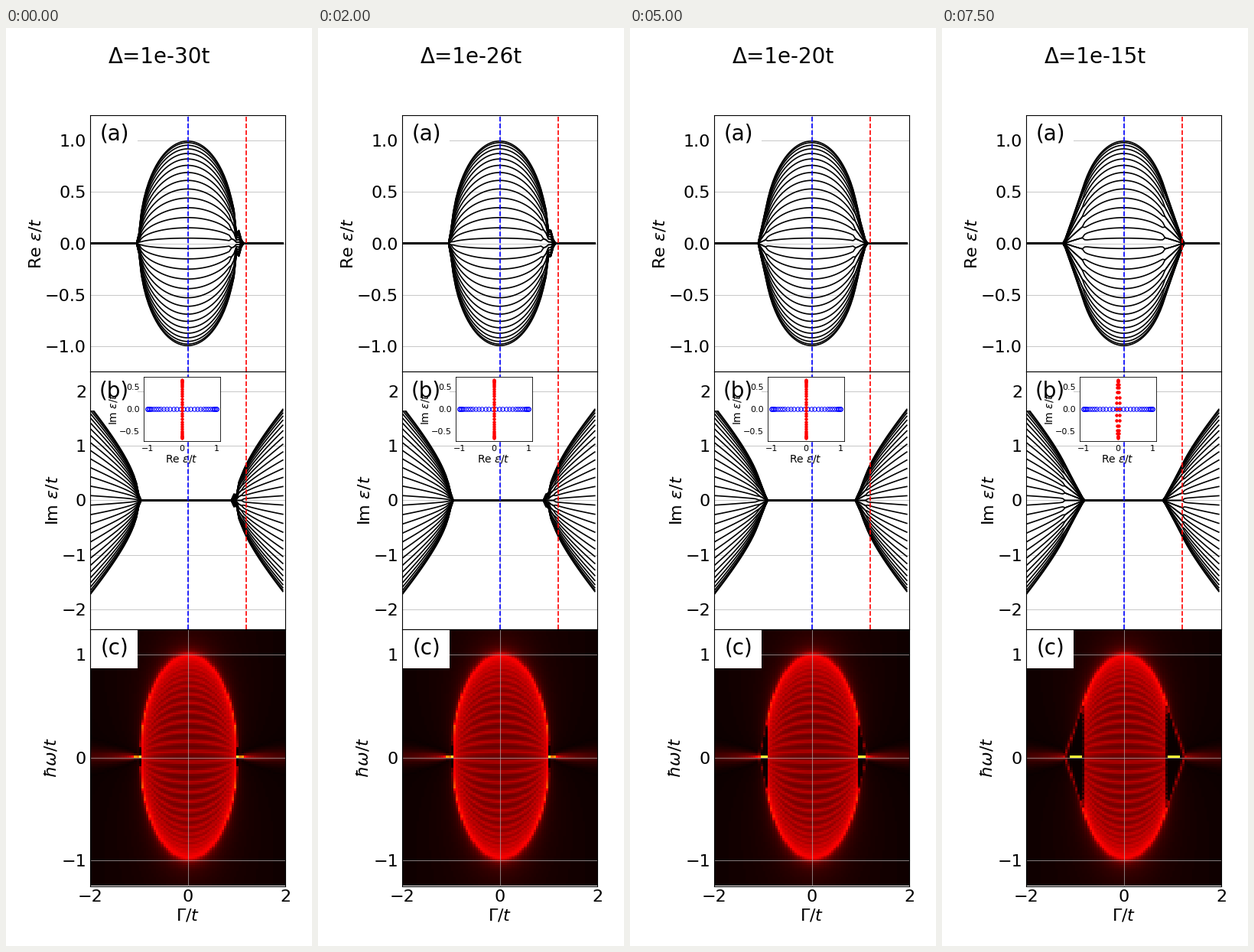
Recreate the animation shown at these times as a matplotlib script. Size 400 by 1200 pixels, loop 8000 ms.

```python
import numpy as np
import matplotlib.pyplot as plt
from matplotlib.animation import FuncAnimation
from matplotlib.patches import Rectangle

W, H = 400, 1200
SITES = 30
ETA = 0.02
FRAMES = 16

gammas = np.arange(-2, 2, 0.05)
omegas = np.linspace(-1.25, 1.25, 125)
BLUE_G, RED_G = 40, 64          # columns of gamma = 0 and gamma = 1.2

plt.rcParams.update({
    "font.family": "DejaVu Sans", "font.size": 16, "mathtext.fontset": "dejavusans",
    "xtick.major.size": 0, "ytick.major.size": 0,
    "grid.color": "#b0b0b0", "grid.linewidth": 0.5,
})


def spectrum(gamma, delta):
    """Eigenvalues of the chain with unequal hoppings and weakly linked ends."""
    # Rounding acts as a faint extra link for positive gamma only.
    link = max(delta, 1e-18 * abs(1 - gamma)) if gamma > 0 else delta
    # The larger hopping goes above the diagonal, where the solver is stable.
    big, small = (1 + abs(gamma)) / 2, (1 - abs(gamma)) / 2
    h = big * np.eye(SITES, k=1) + small * np.eye(SITES, k=-1)
    h[0, -1] = h[-1, 0] = link
    return np.linalg.eigvals(h)


def spectral_map(delta):
    """Root of |Im Tr G|, from the logarithmic derivative of the determinant."""
    z = omegas[:, None] + 1j * ETA + 0 * gammas
    right, left = (1 + gammas) / 2, (1 - gammas) / 2
    prod = right * left
    u0, u1 = np.ones_like(z), z
    d0, d1 = np.zeros_like(z), np.ones_like(z)
    for _ in range(SITES - 1):
        d0, d1 = d1, u1 + z * d1 - prod * d0
        u0, u1 = u1, z * u1 - prod * u0
    det = u1 - delta * (right ** (SITES - 1) + left ** (SITES - 1))
    glow = np.minimum(0.034 * np.sqrt(np.abs((d1 / det).imag)), 0.8)
    loop = np.abs(1 - gammas ** 2) < 2.25 * delta ** (2 / SITES)
    glow[len(omegas) // 2, loop] = 0.8
    return glow


def add_panel(left, top, width, height):
    return fig.add_axes([left / W, 1 - (top + height) / H, width / W, height / H])


def put_text(x, y, text, size=16, rotation=0, **kw):
    fig.text(x / W, 1 - y / H, text, fontsize=size, rotation=rotation,
             ha="center", va="center", **kw)


fig = plt.figure(figsize=(W / 100, H / 100), dpi=100, facecolor="white")
title = fig.suptitle("", fontsize=20, x=0.5, y=0.98)

ax_re, ax_im, ax_map = (add_panel(110, 113.5 + 336 * k, 255, 336) for k in range(3))

image = ax_map.imshow(np.zeros((len(omegas), len(gammas))), cmap="hot", vmin=0, vmax=1,
                      extent=[-2, 2, -1.25, 1.25], origin="lower", aspect="auto",
                      interpolation="nearest")

panels = [
    (ax_re, "(a)", 1.25, [-1, -0.5, 0, 0.5, 1]),
    (ax_im, "(b)", 2.35, [-2, -1, 0, 1, 2]),
    (ax_map, "(c)", 1.25, [-1, 0, 1]),
]
for ax, tag, limit, ticks in panels:
    ax.set_xlim(-2, 2)
    ax.set_ylim(-limit, limit)
    ax.set_xticks([-2, 0, 2])
    ax.set_yticks(ticks)
    ax.grid(True)
    ax.tick_params(labelbottom=ax is ax_map)
    ax.add_patch(Rectangle((0, 1 - 51 / 336), 62 / 255, 51 / 336, transform=ax.transAxes,
                           facecolor="white", edgecolor="none", zorder=2.4))
    ax.text(31.5 / 255, 1 - 25.5 / 336, tag, transform=ax.transAxes, fontsize=20,
            ha="center", va="center")

zeros = np.zeros((len(gammas), SITES))
re_lines = ax_re.plot(gammas, zeros, color="black", lw=1.2)
im_lines = ax_im.plot(gammas, zeros, color="black", lw=1.2)
for ax in (ax_re, ax_im):
    ax.axvline(0, color="blue", ls="--", lw=1.2)
    ax.axvline(1.2, color="red", ls="--", lw=1.2)

inset = add_panel(180, 456, 100, 84)
inset.set_zorder(5)
inset.set_xlim(-1.1, 1.1)
inset.set_ylim(-0.735, 0.735)
inset.set_xticks([-1, 0, 1])
inset.set_yticks([-0.5, 0, 0.5])
inset.tick_params(labelsize=8)
for spine in inset.spines.values():
    spine.set_linewidth(0.6)
blue_dots, = inset.plot([], [], "o", color="blue", mfc="none", ms=4, mew=0.7)
red_dots, = inset.plot([], [], "o", color="red", ms=2.6, mew=0.5)

put_text(39, 281, r"Re $\epsilon/t$", rotation=90)
put_text(61, 617, r"Im $\epsilon/t$", rotation=90)
put_text(59, 954, r"$\hbar\omega/t$", rotation=90)
put_text(238, 1160, r"$\Gamma/t$")
put_text(229, 563, r"Re $\epsilon/t$", size=10, zorder=6)
put_text(140, 498, r"Im $\epsilon/t$", size=10, rotation=90, zorder=6)


def update(i):
    power = 30 - i
    delta = 10.0 ** -power
    title.set_text(f"Δ=1e-{power}t")
    levels = np.array([spectrum(g, delta) for g in gammas])
    for lines, part in ((re_lines, levels.real), (im_lines, levels.imag)):
        for line, y in zip(lines, np.sort(part, axis=1).T):
            line.set_ydata(y)
    for dots, col in ((blue_dots, BLUE_G), (red_dots, RED_G)):
        dots.set_data(levels[col].real, levels[col].imag)
    image.set_data(spectral_map(delta))
    return [title, *re_lines, *im_lines, blue_dots, red_dots, image]


anim = FuncAnimation(fig, update, frames=FRAMES, interval=500, repeat=True,
                     repeat_delay=0, blit=False)
plt.show()
```
